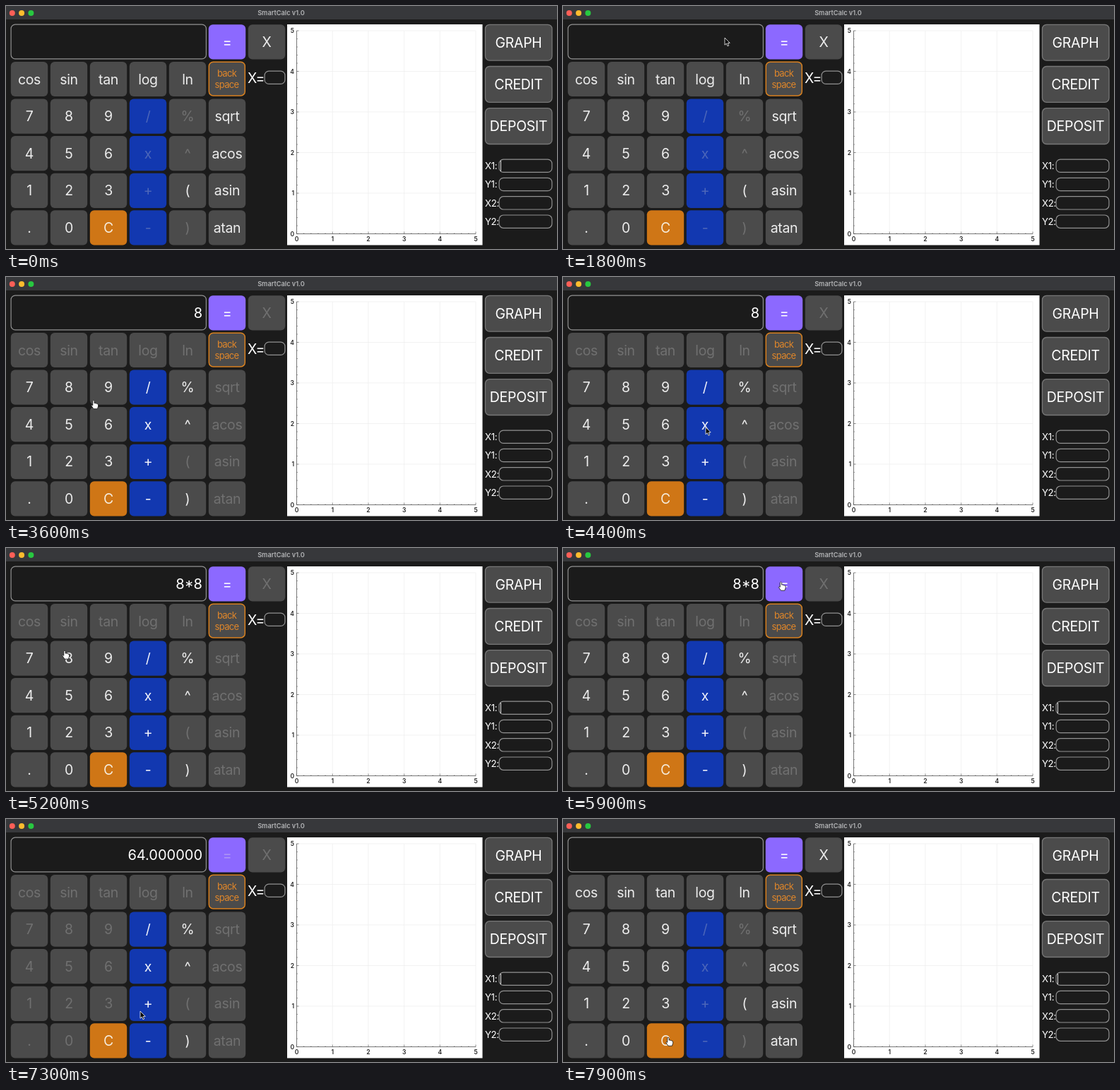
Animation of 780 by 344 pixels, one loop 8000 ms. Source, as an HTML page:

```html
<!DOCTYPE html>
<html lang="en">
<head>
<meta charset="utf-8">
<title>Calculator</title>
<style>
html, body { margin: 0; width: 100%; height: 100%; overflow: hidden; background: #1b1b1b; }
svg { display: block; width: 780px; height: 344px; font-family: Inter, "Open Sans", sans-serif; }
.label { font-size: 19.5px; letter-spacing: -.3px; text-anchor: middle; }
.tick { font-size: 8.5px; font-weight: 600; fill: #222; }
</style>
</head>
<body>
<svg id="stage" viewBox="0 0 780 344"></svg>
<script>
const LOOP = 8000, FRAME = 100;
const stage = document.getElementById('stage');

function add(tag, attrs, content = '') {
  const node = document.createElementNS('http://www.w3.org/2000/svg', tag);
  for (const key in attrs) node.setAttribute(key, attrs[key]);
  node.textContent = content;
  stage.append(node);
  return node;
}
const box = (x, y, width, height, fill, more = {}) => add('rect', { x, y, width, height, fill, ...more });
const text = (x, y, content, more = {}) => add('text', { x, y, fill: '#fff', ...more }, content);
const line = (d, stroke, width, more = {}) => add('path', { d, stroke, 'stroke-width': width, fill: 'none', ...more });
const field = (x, y, w, h, r) => box(x + .6, y + .6, w - 1.2, h - 1.2, '#1b1b1b', { rx: r, stroke: '#919191', 'stroke-width': 1.2 });

// Window
box(0, 0, 780, 344, '#1b1b1b');
box(0, 0, 780, 19, '#37383b');
['#ff5f57', '#febc2e', '#28c840'].forEach((fill, i) => add('circle', { cx: 8.8 + 13.3 * i, cy: 10, r: 4, fill }));
text(389.5, 13, 'SmartCalc v1.0', { 'font-size': 9.2, 'font-weight': 600, 'text-anchor': 'middle', fill: '#b4b5b7' });

// Display
field(6.5, 25.5, 277.5, 50, 6);
const display = text(278, 58, '', { 'font-size': 20, 'text-anchor': 'end' });

// Keypad: each key belongs to a group that is enabled or disabled together
const styles = {
  equals: ['#8c69ff', '#fff', '#ad95f4'],
  operator: ['#1238b0', '#f0f2fa', '#4c66b9'],
  clear: ['#cf7616', '#f5ead9', '#f5ead9'],
  plain: ['#4b4b4b', '#ededed', '#707070']
};
const keys = [];
function key(label, col, row, group) {
  const cx = 33 + 56 * col, cy = 51 + 52.6 * row;
  const [fill, on, off] = styles[group] || styles.plain;
  box(cx - 26.2, cy - 24.7, 52.4, 49.2, fill, { rx: 6 });
  keys.push({ node: text(cx, cy + 7, label, { class: 'label' }), group, on, off });
}
key('=', 5, 0, 'equals');
key('X', 6, 0, 'operand');
['cos', 'sin', 'tan', 'log', 'ln'].forEach((name, i) => key(name, i, 1, 'operand'));
['789', '456', '123', '.0'].forEach((row, r) => [...row].forEach((d, c) => key(d, c, r + 2, 'digit')));
key('C', 2, 5, 'clear');
['/', 'x', '+', '-'].forEach((op, i) => key(op, 3, i + 2, 'operator'));
key('%', 4, 2, 'infix');
key('^', 4, 3, 'infix');
key('(', 4, 4, 'operand');
key(')', 4, 5, 'infix');
['sqrt', 'acos', 'asin', 'atan'].forEach((name, i) => key(name, 5, i + 2, 'operand'));

box(287.3, 79.3, 51, 47.6, '#4b4b4b', { rx: 6, stroke: '#d8801f', 'stroke-width': 1.5 });
['back', 'space'].forEach((word, i) => text(312.5, 100 + 16 * i, word,
  { 'font-size': 13, 'letter-spacing': -.7, 'text-anchor': 'middle', fill: '#df862a' }));
text(342, 109, 'X=', { 'font-size': 19.5, 'letter-spacing': -.8 });
field(365.5, 91.5, 30, 19.5, 6);

// Plot
const px = v => 411.5 + 50.7 * v, py = v => 322.5 - 57.5 * v;
box(398, 26, 276.5, 312.5, '#fff');
for (let i = 1; i <= 5; i++) {
  line(`M${px(i)} 35V322M411 ${py(i)}H665`, '#ededed', .7);
}
line('M411.5 35V322.5H665', '#555', .8);
for (let i = 0; i <= 25; i++) {
  const length = i % 5 ? 1.3 : 3;
  line(`M${px(i / 5)} 322.5v${-length}M411.5 ${py(i / 5)}h${length}`, '#444', .6);
}
for (let i = 0; i <= 5; i++) {
  text(px(i), 332.5, i, { class: 'tick', 'text-anchor': 'middle' });
  text(408, py(i) + 3, i, { class: 'tick', 'text-anchor': 'end' });
}

// Side panel
['GRAPH', 'CREDIT', 'DEPOSIT'].forEach((name, i) => {
  const y = 26 + 59.2 * i;
  box(678.5, y + .3, 94.5, 50.8, '#4b4b4b', { rx: 6, stroke: '#777', 'stroke-width': 1.3 });
  text(725.5, y + 33, name, { class: 'label' });
});
['X1:', 'Y1:', 'X2:', 'Y2:'].forEach((name, i) => {
  text(678, 231 + 26.3 * i, name, { 'font-size': 13.3, 'letter-spacing': -.4 });
  field(697.5, 216.5 + 26.3 * i, 76, 19.5, 6);
});
const caret = box(700, 219, 1, 15, '#ddd');

// Pointers, both with the hot spot at 0,0
const pointers = {
  arrow: add('path', {
    d: 'M0 0V10.2L2.3 8L4 11.8L5.7 11L4.1 7.4H7.2Z',
    fill: '#000', stroke: '#fff', 'stroke-width': .8
  }),
  hand: add('path', {
    d: 'M-1.2 1Q0 -1 1.1 1V4.2Q2.2 3.2 3.2 4.6Q4.5 3.9 5 5.2Q6.6 4.8 6.6 6.4V8.5L5.4 12.2H0L-3.2 7.6Q-3 5.8-1.2 7.3Z',
    fill: '#fff', stroke: '#111', 'stroke-width': .8
  })
};

// time, x, y, pointer
const route = [
  [100, 720, 222, 'arrow'], [300, 560, 290, 'arrow'], [500, 210, 303, 'arrow'],
  [700, 39, 180, 'hand'], [800, 80, 31, 'arrow'], [900, 229, 45, 'arrow'],
  [1800, 229, 45, 'arrow'], [2100, 196, 238, 'arrow'], [2400, 117, 226, 'hand'],
  [2700, 98, 159, 'hand'], [3400, 98, 159, 'hand'], [3800, 150, 190, 'hand'],
  [4100, 202, 212, 'arrow'], [4600, 202, 213, 'arrow'], [5000, 88, 150, 'hand'],
  [5200, 83, 145, 'hand'], [5400, 92, 148, 'hand'], [5600, 190, 105, 'hand'],
  [5800, 309, 49, 'hand'], [6000, 308, 47, 'arrow'], [6300, 308, 47, 'arrow'],
  [6600, 310, 79, 'arrow'], [6900, 326, 143, 'arrow'], [7000, 326, 143, 'arrow'],
  [7300, 190, 272, 'arrow'], [7400, 156, 305, 'hand'], [7500, 149, 309, 'hand']
];

// time, display, enabled groups
const afterOperator = 'equals operand digit clear';
const afterDigit = 'equals operator infix digit clear';
const steps = [
  [0, '', afterOperator],
  [3100, '8', afterDigit],
  [4500, '8*', afterOperator],
  [5100, '8*8', afterDigit],
  [6000, '64.000000', 'operator infix clear'],
  [7700, '', afterOperator]
];

function movePointer(t) {
  const i = route.findLastIndex(stop => stop[0] <= t);
  const from = route[i], to = route[i + 1] || from;
  for (const kind in pointers) {
    pointers[kind].style.display = from && from[3] === kind ? '' : 'none';
  }
  if (!from) return;
  const p = to === from ? 0 : (t - from[0]) / (to[0] - from[0]);
  const x = from[1] + (to[1] - from[1]) * p, y = from[2] + (to[2] - from[2]) * p;
  pointers[from[3]].setAttribute('transform', `translate(${x} ${y})`);
}

function render(t) {
  const [, value, enabled] = steps.findLast(step => step[0] <= t);
  const groups = enabled.split(' ');
  display.textContent = value;
  for (const { node, group, on, off } of keys) {
    node.setAttribute('fill', groups.includes(group) ? on : off);
  }
  caret.style.display = Math.floor((t + 100) / 500) % 2 ? 'none' : '';
  movePointer(t);
}

const start = performance.now();
function tick(now) {
  const t = Math.max(0, now - start) % LOOP;
  render(Math.floor(t / FRAME) * FRAME);
  requestAnimationFrame(tick);
}
render(0);
requestAnimationFrame(tick);
</script>
</body>
</html>
```
